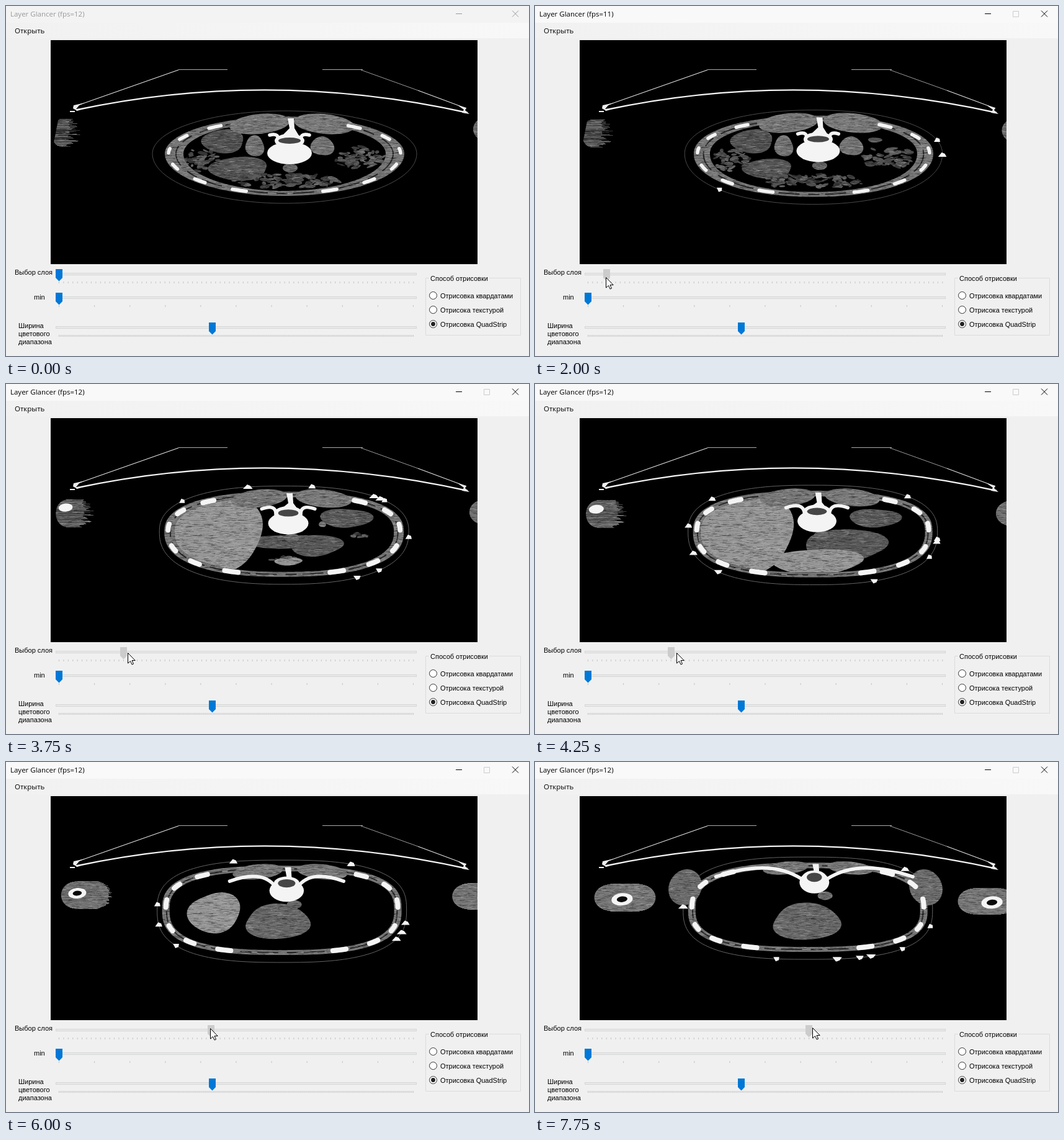
Animation, 843 px wide and 564 px high, one loop 8000 ms. Source, as an HTML page with a canvas:

```html
<!DOCTYPE html>
<html lang="ru">
<head>
<meta charset="utf-8">
<style>
html, body { margin: 0; width: 100%; height: 100%; overflow: hidden; background: #f0f0f0; }
svg, canvas { position: absolute; left: 0; top: 0; }
canvas { left: 72px; top: 55px; background: #000; }
text { font: 11px "Liberation Sans", Arial, sans-serif; white-space: pre; }
.ui { font: 11.5px "Open Sans", "Noto Sans", sans-serif; }
</style>
</head>
<body>
<svg width="843" height="564">
  <defs><linearGradient id="menu"><stop stop-color="#f1f1f1"/><stop offset="1" stop-color="#f8f8f8"/></linearGradient></defs>
  <rect id="bar" width="843" height="27"/>
  <rect y="27" width="843" height="25" fill="url(#menu)"/>
  <text id="title" class="ui" x="7" y="17"></text>
  <text class="ui" x="14" y="44">Открыть</text>
  <path id="buttons" d="M725 12.5H735M816 7.5L826 17.5M826 7.5L816 17.5" fill="none"/>
  <path id="max" d="M770.5 8.5H779.5V17.5H770.5Z" fill="none" stroke="#ccc"/>
  <text x="14" y="433">Выбор слоя</text>
  <text x="45" y="473">min</text>
  <text x="20" y="519">Ширина</text>
  <text x="20" y="532">цветового</text>
  <text x="20" y="545">диапазона</text>
  <g id="tracks"></g>
  <path d="M682 438.5H676.5V530.5H829.5V438.5H779" fill="none" stroke="#dcdcdc"/>
  <text x="684" y="443">Способ отрисовки</text>
  <g id="radios"></g>
</svg>
<canvas id="scan" width="688" height="361"></canvas>
<svg width="843" height="564">
  <path id="cursor" d="M0 0V16.5L4 13L6.6 18.6L9 17.5L6.5 12H11.7Z" fill="#fff" stroke="#000"/>
</svg>
<script>
const $ = id => document.getElementById(id);
const LOOP = 8000, STEP = 250, LAYER = 7.42;
const { PI, sin, cos, sqrt, min, max, abs, sign, round } = Math;

// Controls
const track = (y, x, gap, count) => {
  let ticks = '';
  for (let i = 0; i < count; i++) ticks += `M${(85.5 + i * gap).toFixed(1)} ${y + 12}v3`;
  return `<rect x="80.5" y="${y - 1.5}" width="581" height="3" fill="#e7eaea" stroke="#d6d6d6"/>
    <path d="${ticks}" stroke="#c4c4c4"/>
    <path d="M-5.5 -8H5.5V6L0 11.5L-5.5 6Z" fill="#0078d7" transform="translate(${x} ${y})"/>`;
};
$('tracks').innerHTML = track(432, 85.5, LAYER, 78) + track(470, 85.5, 57.1, 11) + track(518, 332.5, 2.284, 251);
const thumb = $('tracks').querySelectorAll('path')[1];
$('radios').innerHTML = ['Отрисовка квардатами', 'Отрисока текстурой', 'Отрисовка QuadStrip'].map((label, i) => {
  const y = 467 + 23 * i;
  return `<circle cx="688.5" cy="${y - .5}" r="6" fill="#fff" stroke="#333"/>
    ${i === 2 ? `<circle cx="688.5" cy="${y - .5}" r="3.4" fill="#222"/>` : ''}
    <text x="700" y="${y + 4}">${label}</text>`;
}).join('');

// Drawing helpers
const BONE = '#f4f4f4';
const rng = seed => () => (seed = (seed * 16807) % 2147483647) / 2147483647;
const grey = v => `rgb(${v},${v},${v})`;
const clamp = v => max(0, min(1, v));
const easeOut = k => 1 - (1 - k) ** 2;

function layer() {
  const c = document.createElement('canvas');
  c.width = 688;
  c.height = 361;
  return c.getContext('2d');
}
const ctx = $('scan').getContext('2d'), tissue = layer(), streaks = layer();
ctx.translate(-72, -55);
tissue.translate(-72, -55);

const rand = rng(77);
for (let i = 0; i < 26000; i++) {
  const v = rand() < .62 ? 0 : 210;
  streaks.fillStyle = `rgba(${v},${v},${v},${.08 + rand() * .18})`;
  streaks.fillRect(rand() * 688, Math.floor(rand() * 361), 2 + rand() * 9, 1);
}

function ellipse(c, x, y, rx, ry, color, angle = 0) {
  c.fillStyle = color;
  c.beginPath();
  c.ellipse(x, y, max(0, rx), max(0, ry), angle, 0, 2 * PI);
  c.fill();
}
function fill(c, d, color) {
  c.fillStyle = color;
  c.fill(new Path2D(d));
}
function line(c, d, width, color) {
  c.lineWidth = width;
  c.strokeStyle = color;
  c.stroke(new Path2D(d));
}

// Superellipse with separate upper and lower heights
const onOval = ({ x, y, rx, up, down, n }, u) => {
  const c = cos(u), s = sin(u), bend = v => sign(v) * abs(v) ** (2 / n);
  return [x + rx * bend(c), y + (s < 0 ? up : down) * bend(s)];
};
const grow = (o, side, up, down) => ({ ...o, rx: o.rx + side, up: o.up + up, down: o.down + down });
function arc(o, from = 0, to = 2 * PI) {
  const path = new Path2D();
  const count = Math.ceil((to - from) * 24);
  for (let i = 0; i <= count; i++) path.lineTo(...onOval(o, from + (to - from) * i / count));
  return path;
}

function lump(x, y, rx, ry, color) {
  tissue.fillStyle = color;
  tissue.beginPath();
  for (let a = 0; a < 2 * PI; a += .1) {
    const r = 1 + .07 * sin(2 * a + x) + .06 * sin(3 * a + y);
    tissue.lineTo(x + cos(a) * rx * r, y + sin(a) * ry * r);
  }
  tissue.fill();
}

function mesh(x, y, rx, ry, tone, seed) {
  const r = rng(x * 31 + seed + 1);
  for (let i = 0; i < rx * ry / 11; i++) {
    const a = r() * 2 * PI, d = sqrt(r());
    ellipse(tissue, x + cos(a) * d * rx, y + sin(a) * d * ry, 2 + r() * 7, 1 + r() * 2.4, grey(round(tone * (.5 + r() * .6))), r() - .5);
  }
}

// Organs swell and shrink between their first and last layer
const organ = (from, to, tone, x, y, rx, ry, draw = lump) => ({ from, to, tone, x, y, rx, ry, draw });
const organs = [
  organ(20, 70, 105, 438, 258, 58, 28),
  organ(-20, 10, 85, 375, 262, 50, 18),
  organ(5, 16, 90, 455, 254, 90, 14),
  organ(-20, 16, 95, 570, 244, 40, 18, mesh),
  organ(-20, 16, 90, 450, 282, 85, 11, mesh),
  organ(-20, 16, 95, 315, 248, 28, 18, mesh),
  organ(-20, 16, 82, 350, 218, 36, 18),
  organ(3, 24, 88, 548, 216, 40, 16),
  organ(-20, 16, 115, 401, 226, 16, 16),
  organ(-20, 16, 115, 510, 226, 18, 16),
  organ(18, 32, 115, 565, 212, 68, 22),
  organ(12, 27, 90, 500, 260, 68, 26),
  organ(13, 32, 150, 455, 286, 74, 22),
  organ(6, 36, 150, 336, 243, 82, 64)
];

function drawOrgans(at) {
  for (const o of organs) {
    const k = easeOut(clamp(min(at - o.from, o.to - at) / (o.to - o.from) * 3));
    if (k > 0) o.draw(o.x, o.y, o.rx * k, o.ry * k, o.draw === mesh ? o.tone : grey(o.tone), at);
  }
}

// Ragged rows that smooth out as the arm comes into view
function drawArm(x, y, rx, ry, rough, seed) {
  const r = rng(seed);
  for (let dy = -ry; dy <= ry; dy++) {
    const half = rx * sqrt(1 - (dy / ry) ** 2) ** .6;
    const left = max(80 - dy * .2, x - half);
    tissue.fillStyle = grey(round(120 - rough * 80 * r()));
    tissue.fillRect(left, round(y + dy), x + half * (1 - rough * r()) - left, 1);
  }
}

function drawArmBone(x, y, at) {
  const size = clamp((at - 5) / 5), r = 9 + at * .17;
  ellipse(ctx, x, y, r * size, r * .58 * size, BONE, -.1);
  if (at > 20) ellipse(ctx, x, y, r * .5, r * .27, '#080808', -.1);
}

function drawTable() {
  line(ctx, 'M113 161L278 103M742 165L664 136', 1.3, '#ddd');
  line(ctx, 'M278 102.5H357M510 102.5H575', 1, '#aaa');
  line(ctx, 'M572 103L664 136', 1, '#999');
  line(ctx, 'M113 167.5Q425 101 744 172', 2.4, BONE);
  fill(ctx, 'M109 160L127 156L118 160L113 166L126 165L115 169L108 165ZM103 169h8v2h-8ZM728 160L742 164L740 168L747 174L735 172L738 167Z', '#eee');
}

function drawSpine(at) {
  const x = 457 - at * .14, canal = 217 - at * .65, body = 237 - at * .9;
  const tip = 181 - at * .35, wing = canal - 9, span = 32 + at * at * .055;
  ctx.lineCap = 'round';
  for (const side of [-1, 1]) {
    const end = wing + at * .17;
    line(ctx, `M${x + side * 20} ${canal + 3}Q${x + side * span * .45} ${wing - span * .14} ${x + side * span} ${end}`, 5.5, BONE);
  }
  ctx.lineCap = 'butt';
  ellipse(ctx, x, body, 36 - at * .25, 18, BONE);
  ellipse(ctx, x, canal, 24 - at * .1, 11, BONE);
  fill(ctx, `M${x - 3} ${tip}H${x + 7}L${x + 8} ${tip + 16}L${x + 20} ${canal}H${x - 20}L${x} ${tip + 16}Z`, BONE);
  ellipse(ctx, x, canal, 18 - at * .12, 5 + at * .05, grey(70));
}

function drawRibs(wall, at) {
  ctx.strokeStyle = BONE;
  ctx.lineCap = 'round';
  ctx.lineWidth = 8 * clamp((at - 5) / 8);
  for (let i = 0; i < 6; i++) {
    const u = (67 - 24 * i) * PI / 180;
    for (const mid of [u, PI - u]) ctx.stroke(arc(wall, mid - .065, mid + .065));
  }
  ctx.lineCap = 'butt';
}

function drawMarks(skin, at) {
  const r = rng(at * 97 + 5);
  for (let i = 0; i < min(9, at * .6); i++) {
    const [x, y] = onOval(skin, r() * 2 * PI);
    const w = 4 + r() * 4, flip = y > 290 ? -1 : 1;
    fill(ctx, `M${x - w} ${y + 3 * flip}L${x - 1} ${y - 4 * flip}L${x + 4} ${y - 2 * flip}L${x + w} ${y + 3 * flip}Z`, BONE);
  }
}

function drawScan(at) {
  const early = clamp(1 - at / 18), late = clamp((at - 33) / 15);
  const wall = {
    x: 449 - at * at * .004, y: 238, rx: 193,
    up: 60 + at * .33, down: 68 + 6 * sin(at / 48 * PI), n: 2 + min(.7, at * .028)
  };
  const skin = grow(wall, 8 + 12 * clamp(1 - at / 9), 9, 12);
  const side = 12 + 18 * early;
  const hole = grow(wall, -side, -9, -8);
  const cavity = arc(hole);

  tissue.clearRect(72, 55, 688, 361);
  const ring = arc(wall);
  ring.addPath(cavity);
  tissue.fillStyle = grey(118);
  tissue.fill(ring, 'evenodd');
  tissue.lineWidth = 2;
  tissue.strokeStyle = 'rgba(15,15,15,.8)';
  tissue.setLineDash([34, 9, 18, 14]);
  tissue.stroke(arc(grow(wall, -side * .6, -5, -4)));
  tissue.setLineDash([]);

  tissue.save();
  tissue.clip(cavity);
  drawOrgans(at);
  ellipse(tissue, 458 + at * .2, 261 - at * .95, 12, 7, grey(105));
  tissue.restore();

  // Back and chest muscles
  for (const s of [-1, 1]) {
    ellipse(tissue, 461 - at * .1 + s * 52, 190 - at * .4, 49 - at * .25, 16 - at * .12, grey(122), s * .1);
    ellipse(tissue, 436 + s * 194, 202, 26 * late, 30 * late, grey(108), s * -.5);
  }
  const farX = 800 - at * at * .031, farY = 198 + at * .55, rough = clamp(1 - at / 40);
  drawArm(97 + at, 204 + at * .3, 23 + at * .55, 23, rough, 11);
  drawArm(farX, farY, 47, 22, rough * .2, 23);
  tissue.globalCompositeOperation = 'source-atop';
  tissue.drawImage(streaks.canvas, 72, 55);
  tissue.globalCompositeOperation = 'source-over';

  ctx.clearRect(72, 55, 688, 361);
  drawTable();
  ctx.lineWidth = 1;
  ctx.strokeStyle = grey(at > 8 ? 100 : 75);
  ctx.stroke(arc(skin));
  ctx.drawImage(tissue.canvas, 72, 55);
  drawSpine(at);
  drawRibs(grow(wall, -6, -6, -4), at);
  drawMarks(skin, at);
  drawArmBone(92 + at * at * .021, 190 + at * .65, at);
  drawArmBone(farX + 8, farY + 2, at);
}

// Drag: [ms, layer, pointer offset, pointer y]
const drag = [[250, 0, 44, 478], [750, 0, 2, 437], [1000, 0, 0, 437], [2000, 4, -1, 437], [3000, 9, 5, 434],
  [4250, 18, 9, 433], [5000, 25, 6, 433], [6000, 33, -1, 429], [7750, 48, 6, 428]];
const rateChanges = [1000, 2750, 4750, 5500, 6750, 7250];

function dragAt(t) {
  const i = max(1, drag.findIndex(key => key[0] >= t));
  const a = drag[i - 1], b = drag[i];
  const k = clamp((t - a[0]) / (b[0] - a[0]));
  return a.map((v, n) => v + (b[n] - v) * k);
}

function show(t) {
  const active = t >= 750;
  const [, exact, offset, y] = dragAt(t);
  const at = round(exact), x = 85 + round(at * LAYER);
  const fps = 12 - rateChanges.filter(ms => ms <= t).length % 2;
  drawScan(at);
  thumb.setAttribute('transform', `translate(${x + .5} 432)`);
  thumb.setAttribute('fill', active ? '#ccc' : '#0078d7');
  $('title').textContent = `Layer Glancer (fps=${fps})`;
  $('title').setAttribute('fill', active ? '#000' : '#999');
  $('bar').setAttribute('fill', active ? '#f9f9f9' : '#f3f3f3');
  $('buttons').setAttribute('stroke', active ? '#000' : '#999');
  $('max').style.display = active ? '' : 'none';
  $('cursor').style.display = t < 250 ? 'none' : '';
  $('cursor').setAttribute('transform', `translate(${x + round(offset) + .5} ${round(y) + .5})`);
}

let shown = -1;
const start = performance.now();
function tick() {
  const step = Math.floor((performance.now() - start) % LOOP / STEP);
  if (step !== shown) show((shown = step) * STEP);
  requestAnimationFrame(tick);
}
tick();
</script>
</body>
</html>
```
